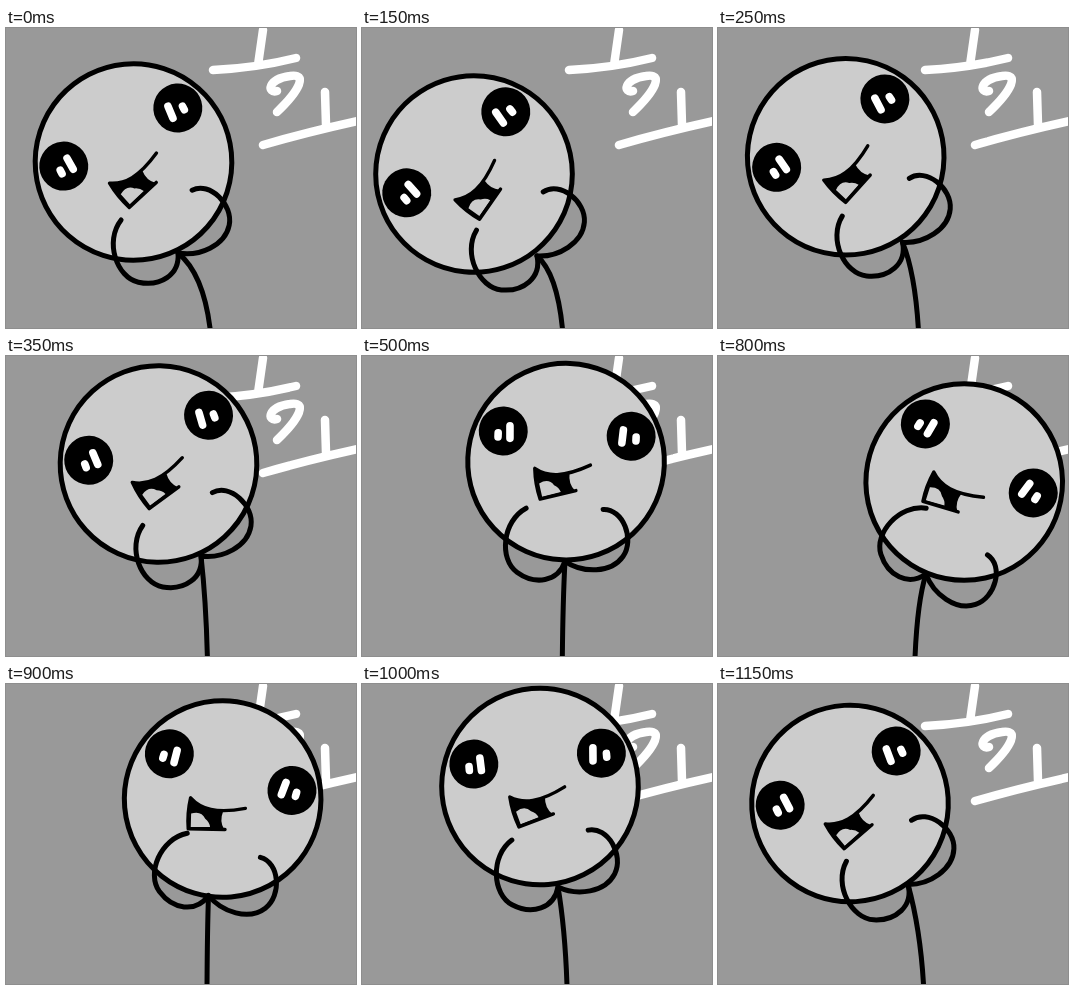
Write an HTML page that moves like this. It is 350x300 px and loops after 1.2 s.

```html
<!DOCTYPE html>
<html lang="en">
<head>
<meta charset="utf-8">
<title>Swaying stick figure</title>
<style>
  html, body { margin: 0; width: 100%; height: 100%; overflow: hidden; background: #999; }
  svg { display: block; width: 100vw; height: 100vh; }
  .line, .chalk { fill: none; stroke: #000; stroke-linecap: round; stroke-linejoin: round; }
  .chalk { stroke: #fff; }
</style>
</head>
<body>
<svg viewBox="0 0 350 300">
  <rect width="350" height="300" fill="#999"/>
  <g class="chalk" stroke-width="8.5">
    <path d="M257 2L252 37M207 42Q250 40 290 30"/>
    <path d="M271 63C261 66 261 51 284 48C302 45 294 62 271 84"/>
    <path d="M319 64L320 97M257 117Q302 104 352 93"/>
  </g>
  <g id="head">
    <circle r="98.3" fill="#ccc" stroke="#000" stroke-width="5"/>
    <circle cx="-64" cy="-28" r="24.5"/>
    <circle cx="64" cy="-28" r="24.5"/>
    <path class="chalk" stroke-width="7.6" d="M-69 -26V-22M-57.5 -33.5L-57 -21M56 -34L55 -21M69 -27.5V-23.5"/>
    <path d="M-31 8C-20 15 -10 15.5 4 11.5Q3 22 10 28.5L-24.4 38.5Z"/>
    <path d="M-26 23Q-17 17 -11 24Q-6 26 -4 30.5L-22.5 36Z" fill="#ccc"/>
    <path class="line" stroke-width="3.4" d="M24.5 2.5C-2 16 -18 16 -31 8Q-30 24 -24.4 38.5L11 28.5"/>
  </g>
  <path id="neck" class="line" stroke-width="5"/>
  <path id="hands" class="line" stroke-width="5"
    d="M-39 -53C-63 -40 -66 -2 -48 11S-7 21 0 0C18 12 46 12 58 -5S58 -53 38 -52"/>
</svg>
<script>
const STEP = 50, COUNT = 24;

// key poses: step, head x, y, tilt, neck x, y, hand swing
const POSES = [
  [0, 127.5, 134, -27, 172, 225, -23.5],
  [3, 112, 146, -39.3, 175, 228, -30.6],
  [7, 152.5, 108, -20.6, 195, 200, -26],
  [9, 188, 102.3, -6, 200, 202, -11],
  [12, 230.4, 115.5, 17.7, 208, 212.5, 21.5],
  [16, 246.2, 126, 32.6, 208, 218, 36.5],
  [20, 178, 102.5, -4.9, 196, 203, -8.2],
  [22, 152.5, 107.5, -18, 193, 199, -26],
  [23, 132, 119.5, -25, 190, 200.5, -33]
];

const [head, neck, hands] = ["head", "neck", "hands"].map(id => document.getElementById(id));

// key pose at any index, wrapped around the loop
function key(i) {
  const n = POSES.length, turn = Math.floor(i / n);
  const [step, ...rest] = POSES[i - turn * n];
  return [step + turn * COUNT, ...rest];
}

// smooth cubic through the key poses
function poseAt(step) {
  const i = POSES.findLastIndex(p => p[0] <= step);
  const [a, b, c, d] = [-1, 0, 1, 2].map(k => key(i + k));
  const span = c[0] - b[0], u = (step - b[0]) / span, w = 1 - u;
  return b.map((v, k) => {
    const m0 = (c[k] - a[k]) / (c[0] - a[0]) * span;
    const m1 = (d[k] - v) / (d[0] - b[0]) * span;
    return w * w * (v * (1 + 2 * u) + m0 * u) + u * u * (c[k] * (1 + 2 * w) - m1 * w);
  });
}

function place(el, x, y, angle) {
  el.setAttribute("transform", `translate(${x} ${y}) rotate(${angle})`);
}

function draw(ms) {
  const step = Math.floor(ms / STEP) % COUNT;
  const [, x, y, tilt, nx, ny, swing] = poseAt(step);
  const turn = step / COUNT * 2 * Math.PI;
  const foot = 201 + 3.5 * Math.cos(turn) - 2.7 * Math.sin(2 * turn);
  const bend = foot + (nx - foot) * 0.2;
  place(head, x, y, tilt);
  place(hands, nx, ny, swing);
  neck.setAttribute("d", `M${nx} ${ny}Q${bend} 246 ${foot} 304`);
}

const start = performance.now();
function tick() {
  draw(performance.now() - start);
  requestAnimationFrame(tick);
}
draw(0);
requestAnimationFrame(tick);
</script>
</body>
</html>
```
